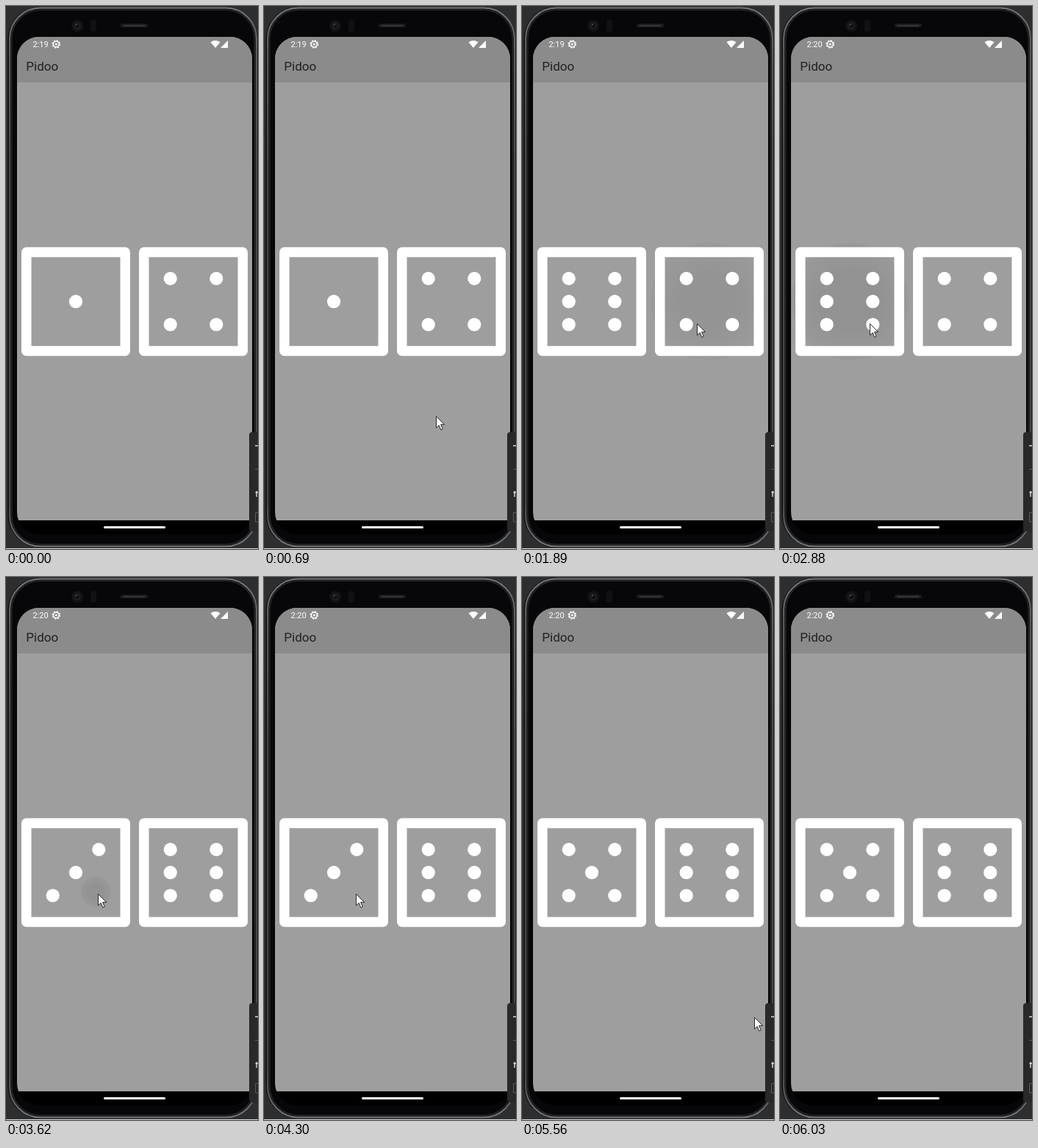
These frames come from a looping animation (343x739 px, 6.56 s). An HTML page:

```html
<!DOCTYPE html>
<html lang="en">
<head>
<meta charset="utf-8">
<title>Dice app</title>
<style>
html, body { margin: 0; width: 100%; height: 100%; overflow: hidden; background: #2d2e30; }
svg { display: block; width: 343px; height: 739px; }
text { font-family: Roboto, sans-serif; }
</style>
</head>
<body>
<svg viewBox="0 0 343 739" xmlns="http://www.w3.org/2000/svg">
  <defs>
    <clipPath id="screen"><rect x="15" y="42" width="320" height="677" rx="30"/></clipPath>
    <linearGradient id="rim" x1="0" y1="0" x2="0" y2="1">
      <stop offset="0" stop-color="#77787a"/>
      <stop offset=".08" stop-color="#5c5c5e"/>
      <stop offset=".3" stop-color="#48484a"/>
      <stop offset=".92" stop-color="#48484a"/>
      <stop offset="1" stop-color="#77787a"/>
    </linearGradient>
    <radialGradient id="ink">
      <stop offset="0" stop-color="#00000c"/>
      <stop offset=".5" stop-color="#00000c"/>
      <stop offset="1" stop-color="#00000c" stop-opacity=".4"/>
    </radialGradient>
  </defs>

  <!-- phone body -->
  <rect width="343" height="739" fill="#2d2e30"/>
  <rect y="738" width="343" height="1" fill="#d8d8d8"/>
  <rect x="2.5" y="1" width="340" height="736" rx="44" fill="#131315"/>
  <rect x="5" y="2.5" width="336" height="733" rx="42" fill="#1d1d1f" stroke="url(#rim)" stroke-width="2"/>
  <rect x="8" y="5.5" width="330" height="727" rx="39" fill="#070609" stroke="#29292b"/>
  <circle cx="97" cy="27" r="8" fill="#131315"/>
  <circle cx="97" cy="27" r="4.5" fill="#202124"/>
  <circle cx="97" cy="27" r="2.5" fill="#0c0c10"/>
  <circle cx="96" cy="25.5" r="1" fill="#5c5c64"/>
  <rect x="115" y="19" width="8" height="16" rx="3" fill="#111113"/>
  <rect x="156" y="24" width="37" height="5" rx="2.5" fill="#1c1c1e"/>
  <rect x="160" y="26" width="29" height="1.5" fill="#3b3b3d"/>

  <g clip-path="url(#screen)">
    <rect x="15" y="42" width="320" height="677" fill="#000"/>
    <rect x="15" y="42" width="320" height="658" fill="#9e9e9e"/>
    <rect x="15" y="42" width="320" height="62" fill="#8b8b8b"/>
    <circle id="ripple" fill="url(#ink)"/>
  </g>
  <rect x="133" y="708" width="84" height="3" rx="1.5" fill="#fff"/>

  <!-- status bar and title -->
  <text id="clock" x="36.5" y="56" font-size="11" fill="#fff"></text>
  <g fill="none" stroke="#fff">
    <circle cx="68.3" cy="52" r="3.9" stroke-width="1.5"/>
    <circle cx="68.3" cy="52" r="5.1" stroke-width="1.4" stroke-dasharray="2 2.006"/>
  </g>
  <circle cx="68.3" cy="52" r="1.5" fill="#fff"/>
  <path d="M278.5 49.3Q285 44.7 291.5 49.3L285 57ZM292 57L302 47V57Z" fill="#fff"/>
  <text x="27.3" y="88" font-size="17" fill="#212121">Pidoo</text>

  <g id="dice"></g>

  <!-- side toolbar -->
  <rect x="331" y="580" width="20" height="135" rx="4" fill="#28292b"/>
  <path d="M339 598.5H343M341 660V668M339.5 662H343" stroke="#dcdcdc" stroke-width="1.4"/>
  <path d="M339 630.5H343M343 689.5H339.5V702H343" stroke="#5b5c5f" fill="none"/>

  <path id="cursor" d="M.5 .5V16L4.2 12.6L6.8 18.8L9.2 17.8L6.6 11.7H11.6Z" fill="#fff" stroke="#151515" stroke-width=".9" stroke-linejoin="round"/>
</svg>

<script>
const LOOP = 6560, STEP = 200 / 3;
const $ = id => document.getElementById(id);
const lerp = (a, b, u) => a + (b - a) * u;
const clamp = u => Math.max(0, Math.min(1, u));

// Pip places on a 3 by 3 grid, as [column, row] from the centre.
const DIAG = [[-1, 1], [1, -1]], ANTI = [[-1, -1], [1, 1]], SIDE = [[-1, 0], [1, 0]];
const FACES = {
  1: [[0, 0]],
  3: [...DIAG, [0, 0]],
  4: [...DIAG, ...ANTI],
  5: [...DIAG, ...ANTI, [0, 0]],
  6: [...DIAG, ...ANTI, ...SIDE]
};

// [time, left, right]
const ROLLS = [[0, 1, 4], [1760, 6, 4], [2950, 6, 3], [3620, 3, 6], [4500, 5, 6]];

// Finger down, release, full alpha until, gone; touch point and die centre.
const TAPS = [
  { down: 1560, up: 1760, hold: 1820, end: 2220, x: 238, y: 432, cx: 255 },
  { down: 2750, up: 2750, hold: 2910, end: 3350, x: 122, y: 432, cx: 95 },
  { down: 3620, up: 3620, hold: 3760, end: 4230, x: 125, y: 431, cx: 95 },
  { down: 4430, up: 4430, hold: 4560, end: 4760, x: 125, y: 431, cx: 95 }
];

// [time, x, y, glides to the next point]
const PATH = [
  [430, 293, 728, 1], [560, 276, 660, 1], [700, 233, 555, 1], [860, 193, 470, 1],
  [1020, 230, 433], [1090, 233, 433], [1290, 236, 432], [1560, 238, 432],
  [2080, 238, 432, 1], [2350, 138, 432], [2420, 122, 432], [3420, 125, 431],
  [5363, 125, 431, 1], [5430, 178, 472, 1], [5497, 265, 550, 1], [5560, 316, 598, 1],
  [5640, 326, 620, 1], [5800, 329, 665, 1], [6025, 318, 739]
];

const last = (list, t) => list.filter(k => k[0] <= t).pop();

function die(cx, n) {
  const pips = FACES[n].map(([c, r]) =>
    `<circle cx="${cx + c * 31.3}" cy="${402.2 + r * 31.3}" r="9.1"/>`).join("");
  return `<rect x="${cx - 67.25}" y="335" width="134.5" height="134.5" fill="none"
    stroke="#fff" stroke-width="13.5" stroke-linejoin="round"/><g fill="#fff">${pips}</g>`;
}

function drawRipple(t) {
  const tap = TAPS.find(p => t >= p.down && t < p.end);
  const el = $("ripple");
  el.setAttribute("opacity", tap ? 0.075 * (1 - clamp((t - tap.hold) / (tap.end - tap.hold))) : 0);
  if (!tap) return;
  const u = clamp((t - tap.up) / 110);
  el.setAttribute("cx", lerp(tap.x, tap.cx, u));
  el.setAttribute("cy", lerp(tap.y, 402, u));
  el.setAttribute("r", lerp(15, 80, u));
}

function drawCursor(t) {
  const el = $("cursor");
  const shown = t >= 430 && t < 6025;
  el.setAttribute("visibility", shown ? "visible" : "hidden");
  if (!shown) return;
  const a = last(PATH, t), b = PATH[PATH.indexOf(a) + 1];
  const u = a[3] ? clamp((t - a[0]) / (b[0] - a[0])) : 0;
  const x = u ? lerp(a[1], b[1], u) : a[1], y = u ? lerp(a[2], b[2], u) : a[2];
  el.setAttribute("transform", `translate(${Math.round(x)} ${Math.round(y)})`);
}

let shownRoll;
function draw(ms) {
  // Motion advances at 15 pictures a second.
  const t = ms < 412 ? 0 : 430 + Math.floor((ms - 412) / STEP) * STEP;
  const roll = last(ROLLS, t);
  if (roll !== shownRoll) {
    $("dice").innerHTML = die(95, roll[1]) + die(255, roll[2]);
    shownRoll = roll;
  }
  $("clock").textContent = t < 2220 ? "2:19" : "2:20";
  drawRipple(t);
  drawCursor(t);
}

const start = performance.now();
function tick() {
  draw((performance.now() - start) % LOOP);
  requestAnimationFrame(tick);
}
tick();
</script>
</body>
</html>
```
